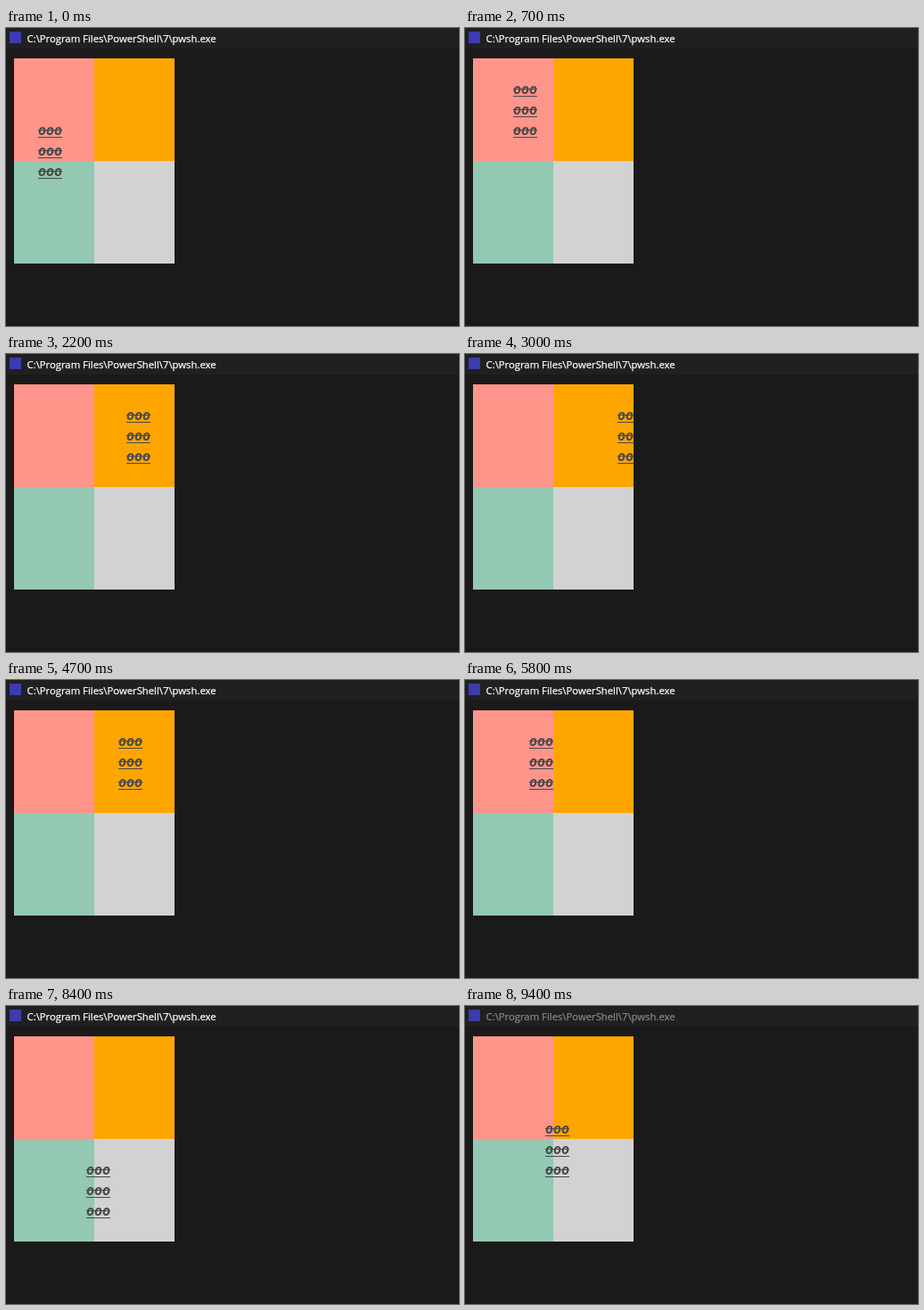
An HTML page with a canvas for the animation above (9.6 s loop, 508 by 334 pixels).

```html
<!DOCTYPE html>
<html lang="en">
<head>
<meta charset="utf-8">
<title>Terminal</title>
<style>
  html, body { margin: 0; width: 100%; height: 100%; overflow: hidden; background: #1a1a1a; }
  canvas { display: block; }
</style>
</head>
<body>
<canvas id="stage" width="508" height="334"></canvas>
<script>
const ctx = document.getElementById('stage').getContext('2d');
const LOOP = 9600, TICK = 100;
const CELL_W = 9, CELL_H = 23, LEFT = 9, TOP = 34, COLS = 20, ROWS = 10;
const INK = '#494949';

// Held keys: first press, repeat interval, presses, direction
const runs = [
  { at: 100,  every: 200, n: 2,  dx: 0,  dy: -1 },
  { at: 400,  every: 170, n: 15, dx: 1,  dy: 0 },
  { at: 3100, every: 200, n: 2,  dx: 1,  dy: 0 },
  { at: 3590, every: 170, n: 13, dx: -1, dy: 0 },
  { at: 5900, every: 160, n: 3,  dx: 0,  dy: 1 },
  { at: 6400, every: 100, n: 2,  dx: 1,  dy: 0 },
  { at: 6700, every: 180, n: 6,  dx: 0,  dy: 1 },
  { at: 7900, every: 150, n: 6,  dx: 0,  dy: -1 }
];

function blockAt(t) {
  let col = 3, row = 3;
  for (const run of runs) {
    if (t < run.at) continue;
    const presses = Math.min(run.n, Math.floor((t - run.at) / run.every) + 1);
    col += run.dx * presses;
    row += run.dy * presses;
  }
  return { col, row };
}

function rect(color, x, y, w, h) {
  ctx.fillStyle = color;
  ctx.fillRect(x, y, w, h);
}

function drawCell(col, row) {
  if (col >= COLS || row >= ROWS) return;
  const x = LEFT + col * CELL_W, y = TOP + row * CELL_H;
  ctx.fillStyle = INK;
  ctx.font = 'italic bold 15px "DejaVu Sans Mono", monospace';
  ctx.fillText('o', x, y + 17);
  ctx.fillRect(x, y + 11, CELL_W, 1);
  ctx.fillRect(x, y + 19, CELL_W, 1);
}

function drawTitleBar(focused) {
  const title = 'C:\\Program Files\\PowerShell\\7\\pwsh.exe';
  rect('#202020', 0, 0, 508, 23);
  rect('#3a3cb0', 4, 4, 13, 13);
  ctx.fillStyle = ctx.strokeStyle = focused ? '#ffffff' : '#868686';
  ctx.font = '11.3px "Open Sans", "Noto Sans", sans-serif';
  ctx.lineWidth = 0.25;
  ctx.fillText(title, 23.5, 16);
  ctx.strokeText(title, 23.5, 16);
}

function draw(t) {
  rect('#1a1a1a', 0, 0, 508, 334);
  drawTitleBar(t < 9000);
  const w = COLS * CELL_W / 2, h = ROWS * CELL_H / 2;
  ['#ff948a', '#ffa500', '#93c8b2', '#d2d2d2'].forEach((color, i) =>
    rect(color, LEFT + (i % 2) * w, TOP + (i >> 1) * h, w, h));
  const { col, row } = blockAt(t);
  for (let i = 0; i < 9; i++) drawCell(col + i % 3, row + Math.floor(i / 3));
}

const start = performance.now();
function loop() {
  const t = (performance.now() - start) % LOOP;
  draw(Math.floor(t / TICK) * TICK);
  requestAnimationFrame(loop);
}
loop();
</script>
</body>
</html>
```
